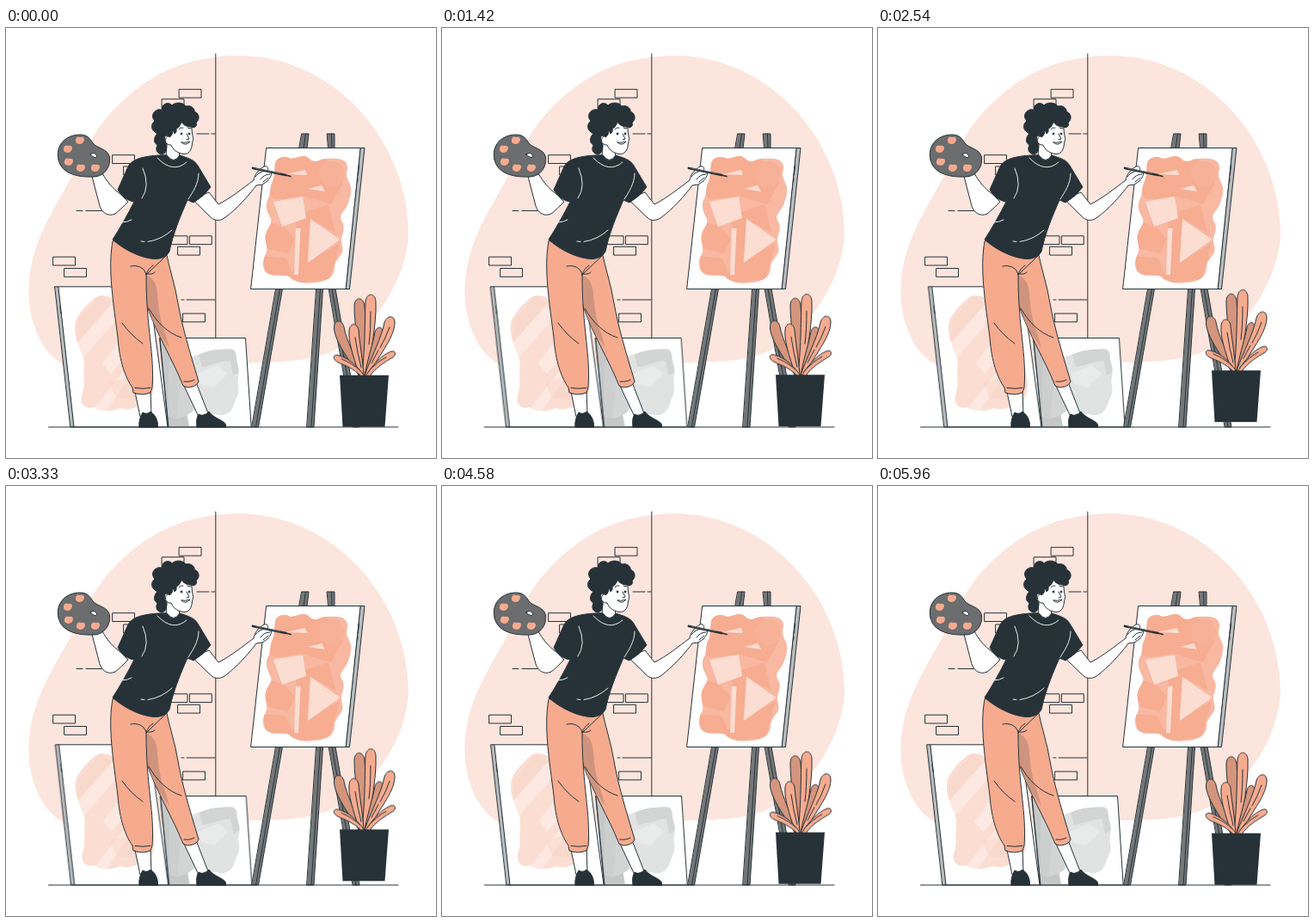
Recreate the animation shown at these times as an HTML page without scripts. Size 500 px wide and 500 px high, loop 6000 ms.

```html
<!DOCTYPE html>
<html lang="en">
<head>
<meta charset="utf-8">
<title>Painter at the easel</title>
<style>
  html, body { margin: 0; width: 100%; height: 100%; overflow: hidden; background: #fff; }
  svg { display: block; width: 100vw; height: 100vh; }
  .ink { stroke: #263238; stroke-width: 1; stroke-linecap: round; stroke-linejoin: round; }
  .none { fill: none; }
  .white { fill: #fff; }
  .dark { fill: #263238; }
  .orange { fill: #f6ab8f; }
  .side { fill: #b9bcbd; }
  .wood { fill: #747778; }
  .shade { fill: #d4957c; }
  .seam { fill: none; stroke: #fff; stroke-width: .9; stroke-linecap: round; }
  .shake { animation: shake 6s linear -20ms infinite; }
  .float { animation: float 1.5s linear -20ms infinite; }
  @keyframes shake {
    0%, 100% { transform: translateX(0); }
    10%, 90% { transform: translateX(-1px); }
    20%, 80% { transform: translateX(2px); }
    30%, 50%, 70% { transform: translateX(-4px); }
    40%, 60% { transform: translateX(4px); }
  }
  @keyframes float {
    0%, 100% { transform: translateY(0); }
    50% { transform: translateY(-10px); }
  }
</style>
</head>
<body>
<svg viewBox="0 0 500 500">
  <defs>
    <rect id="brick" width="25.500" height="9.800" class="ink none"/>
    <path id="pinkShape" d="M103 314C109 309 119 311 124 315C136 318 146 330 154 345L170 400C174 414 172 430 164 436C150 440 146 446 132 442C122 447 109 446 102 441C92 444 86 437 88 428C93 415 89 405 91 393C92 382 86 377 84 367C79 357 79 345 82 338C87 329 94 321 103 314Z"/>
    <path id="greyShape" d="M190 388C205 390 215 382 228 378C240 373 254 374 262 373C269 374 267 384 269 390C273 401 268 407 270 416C272 426 267 430 265 438C261 450 251 452 244 449C232 450 229 442 220 443C208 454 198 455 189 452Z"/>
    <path id="artShape" d="M313 157C315 150 325 148 331 152C338 152 344 147 350 150C355 154 358 157 364 154C372 151 380 152 385 152C393 152 398 157 397 164C394 174 399 177 401 185C402 194 399 200 397 206C393 214 387 217 390 224C395 231 392 238 390 244C389 251 394 257 390 263C386 269 382 272 382 279C382 291 369 296 358 296C346 298 336 295 330 290C323 285 311 290 304 285C297 280 298 270 302 263C306 256 300 248 302 240C304 232 310 229 308 222C304 214 301 208 304 200C309 192 306 188 309 181C313 173 312 165 313 157Z"/>
    <clipPath id="pinkClip"><use href="#pinkShape"/></clipPath>
    <clipPath id="greyClip"><use href="#greyShape"/></clipPath>
    <clipPath id="artClip"><use href="#artShape"/></clipPath>
  </defs>

  <!-- wall -->
  <path fill="#fce5dd" d="M270 32C380 32 468 130 468 240C466 290 430 348 385 373C352 391 300 389 240 389C160 389 95 412 60 387C32 366 22 320 28 285C34 240 60 205 80 166C86 154 95 137 103 124C119 98 150 66 190 48C215 37 245 32 270 32Z"/>
  <path class="ink none" d="M243.800 30V361M222 123H236M239 123H243M82 212.500H89M93 212.500H125M204 316H207M210 316H243"/>
  <use href="#brick" x="201.500" y="71.300"/><use href="#brick" x="181.500" y="82.700"/>
  <use href="#brick" x="124" y="147.700"/><use href="#brick" x="137" y="161"/>
  <use href="#brick" x="185.500" y="241.800"/><use href="#brick" x="213.800" y="241.800"/>
  <use href="#brick" x="200" y="254.300"/><use href="#brick" x="55" y="266.200"/>
  <use href="#brick" x="68" y="279.500"/><use href="#brick" x="206" y="332"/>

  <!-- leaning canvases -->
  <g class="shake">
    <path class="ink white" d="M60.800 300.800H166L188 464H79Z"/>
    <path class="ink side" d="M57 300.800H60.800L79 464H75.200Z"/>
    <path class="ink none" d="M63 324L64 332"/>
    <use href="#pinkShape" fill="#fbddd2"/>
    <g clip-path="url(#pinkClip)">
      <path fill="#fde9e1" d="M78 372L122 322L134 333L86 388ZM112 390L150 340V372L122 402ZM98 448L140 395L146 403L112 452Z"/>
      <path fill="#fad6ca" opacity=".5" d="M84 340L110 310L122 322L82 366ZM120 412L170 400V435L128 430Z"/>
    </g>
    <path class="ink white" d="M179 360.500H278.500L285.200 464H189Z"/>
    <path fill="#c6c8c8" d="M179.500 361H195L213 463.500H189Z"/>
    <use href="#greyShape" fill="#e1e2e2"/>
    <g clip-path="url(#greyClip)">
      <path fill="#cdcfcf" d="M188 384L203 384L212 462H186Z"/>
      <path fill="#d3d5d5" d="M224 380C240 371 270 370 270 381L264 388C252 385 240 393 228 394ZM260 384L272 382V400L264 404ZM203 408L222 416L216 450L198 456Z"/>
      <path fill="#e9eaea" d="M222 402L246 392L258 402L242 418L226 414Z"/>
    </g>
    <path class="ink none" d="M179 360.500L189 464"/>
  </g>

  <!-- easel -->
  <g class="ink">
    <path class="wood" d="M344 123H352L350 140H341ZM373.500 123H382V140H375ZM314 303H321.500L293.500 464H286ZM361 303H368.500L358 464H350ZM375.500 303H383L411 464H403.500Z"/>
    <path class="none" d="M348.500 123L346 140M378.500 123L379 140M318.500 303L290.500 464M365.500 303L355 464M379 303L407 464"/>
    <path class="white" d="M303 139.500H412.500L395.500 303.500H285Z"/>
    <path class="side" d="M412.500 139.500H417L399.500 303.500H395.500Z"/>
    <path class="none" d="M410.500 160L409.300 171M409 175L408.600 179"/>
  </g>
  <use href="#artShape" fill="#f8b8a1"/>
  <g clip-path="url(#artClip)">
    <path fill="#f6ad92" d="M305 142H365L392 180L378 205L348 196L312 199L300 190ZM300 224L322 230L336 245L328 262L298 255ZM336 218L375 205L383 238L354 222L350 272L388 250L376 292L328 298L341 262ZM299 265L326 268L334 288L302 288Z"/>
    <circle cx="379" cy="170" r="15" fill="#f7b199"/>
    <path fill="#fcddd2" d="M311 202L345 196L349 221L321 231ZM354 222L388.500 246L351 273ZM337 233H342.500L340 287H335ZM326 170L348 165L350 171ZM351 187L367 183L371 190Z"/>
  </g>

  <path class="ink" d="M49.500 464H456"/>

  <!-- painter -->
  <g class="ink">
    <path class="white" d="M150 423L156 452L169 449L168 422ZM206 414L224 452L235 448L221 412Z"/>
    <path class="dark" d="M155 464C154 457 157 450 159 447Q164 450 168 446C174 450 177 457 176.500 464ZM222 464C221 457 222 452 224 449Q230 453 236 446C240 453 253 456 255.500 461V464Z"/>
    <path class="orange" d="M186 260C190 280 197 300 200 320C205 348 213 374 224 411C222 417 211 420 206 416C194 386 176 357 164 324L160 280Z"/>
    <path fill="#cf947d" stroke="none" d="M163 288C170 289 175 297 176 308C177 327 180 343 185 355L190 372C178 357 170 341 165 325Z"/>
    <path class="orange" d="M124 248C118 280 125 320 130 360C132 388 139 407 147 418L148 424Q158 428 168 424L170 418C173 380 163 350 163 287L187 264L186 252Z"/>
    <path class="none" d="M163 287C162 279 153 275 145 277M163 287C164 282 168 278 171 276M164 286Q170 287 173 284M135 343Q145 357 159 367M166 326C175 342 188 355 204 360M150 418.500Q159 420 168 418.500M207 411Q214 412 219 409"/>
    <path class="white" d="M100 171L112 169C117 178 124 187 133 193L142 202C137 207 132 212 127 216C118 220 111 214 109 207Z"/>
    <path class="white" d="M217 199L236 191L247 205C261 198 276 186 288 177C289 170 294 165 300 161C303 160 306 162 304 166L308 168C310 171 306 175 304 178L298 182L291 183C283 194 268 211 254 221C248 225 242 224 238 220Z"/>
    <path class="none" d="M290 173Q294 167 302 166M296 176Q300 170 307 170M299 179L305 174"/>
    <path class="white" d="M187 130L186 151Q194 161 202 152L201 142Z"/>
    <path class="dark" d="M178 148C160 149 147 152 142 161L130 188C134 195 141 201 149 202C142 216 133 232 124 246C136 257 158 269 176 268.500Q186 267 190 260C194 240 203 218 211 200L218 203Q230 196 238 185L223 160C219 153 211 151 202 148Q195 159 187 148Z"/>
    <path class="white" d="M189 105L215 106L216.500 123Q219 129 216.500 134C216 143 212 147 206 146.500C198 145 194 141 192 136A5 5 0 1 1 190 125Z"/>
    <path class="dark" d="M181 147Q172 145 176 136C170 133 173 125 176 123C168 119 168 112 173 108C167 102 173 93 181 95C181 88 189 85 193 90C198 85 207 87 209 91C216 89 220 95 219 97C226 100 225 107 221 110C223 114 219 117 215 115C211 115 206 113 204 109C203 113 200 117 198 117Q199 121 196 123L194 118Q194 125 190 127C186 123 183 126 185 132L187 136C187 142 186 146 181 147Z"/>
    <path class="none" d="M201 118Q203 115 206 116M211 116L215 117M210 123L213 129L210 130M204 133Q209 138 214 132Q209 134 204 133"/>
    <ellipse class="dark" cx="204" cy="123" rx=".8" ry="1.200"/><ellipse class="dark" cx="213" cy="123" rx=".8" ry="1.200"/>
    <path fill="#6b6d6e" d="M61 153C57 136 70 124 86 124C95 124 98 129 101 134C106 140 118 140 120.500 150C122 161 115 172 103 173C80 174 64 168 61 153Z"/>
  </g>
  <path class="seam" d="M159 163Q168 184 158 198M224 169C224 181 217 191 212 199M176 151Q194 170 210 156M134 226Q141 226 146 223M157 248L161 248.500M165 248.500Q181 246 193 235"/>
  <g fill="#f6ab8f">
    <path id="dab" d="M67 140Q68 135 72 137Q77 136 77 140Q76 145 71 145Q66 144 67 140Z"/>
    <use href="#dab" x="14" y="-10"/><use href="#dab" x="1" y="15"/>
    <use href="#dab" x="15" y="22"/><use href="#dab" x="32" y="22"/>
  </g>
  <path class="ink white" d="M98 147Q103 143 106 149Q104 153 98 147Z"/>
  <path fill="none" stroke="#263238" stroke-width="2.800" stroke-linecap="round" d="M287 163L325 171"/>
  <path fill="none" stroke="#263238" stroke-width="1.800" stroke-linecap="round" d="M325 171L331 172.500"/>
  <path fill="none" stroke="#747778" stroke-width=".8" d="M290 163L319 169"/>

  <!-- plant -->
  <g class="float">
    <g class="ink orange">
      <path class="shade" d="M413 404C410 370 405 345 405 324C405 312 416 312 417 324C419 350 419 375 418 404Z"/>
      <path d="M414 404C418 365 417 340 418 319C419 307 430 308 430 319C431 345 424 375 421 404Z"/>
      <path class="shade" d="M410 404C398 385 383 365 381.500 350C381 338 391 339 393 348C396 365 406 380 413 404Z"/>
      <path class="shade" d="M417 404C422 380 427 365 429 354C431 346 439 347 438 355C437 365 427 385 421 404Z"/>
      <path d="M417 404C426 380 436 362 440 343C443 333 453 334 452 344C451 362 432 382 422 404Z"/>
      <path d="M411 404C403 380 398 365 399 352C400 342 409 343 410 352C411 365 414 380 416 404Z"/>
      <path d="M418 405C428 390 437 381 446 377C452 374 455 379 450 383C440 389 430 395 423 405Z"/>
      <path d="M413 405C404 396 395 393 386 389C379 385 380 379 387 381C400 385 408 393 417 405Z"/>
      <path class="none" d="M424 330Q424 352 422 368M406 360Q409 380 413 395M446 348Q441 362 435 372M433 375L425 390M421 400Q432 388 442 383M390 385Q403 390 412 399"/>
    </g>
    <path class="dark" d="M388 404H445L440.500 464H391.500Z"/>
  </g>
</svg>
</body>
</html>
```
